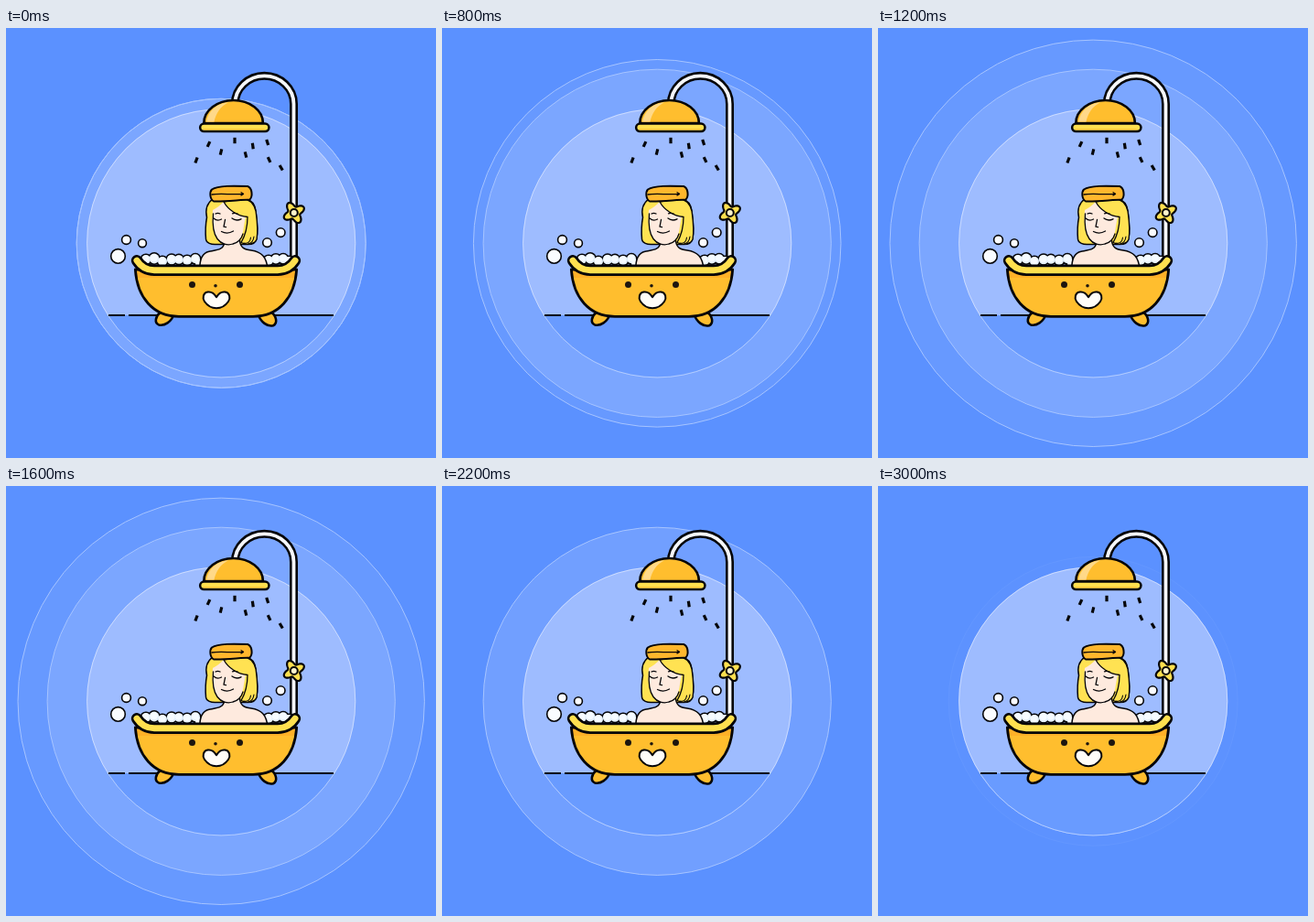
Animation of 470x470 px, one loop 3200 ms. Source, as an HTML page with a canvas:

```html
<!DOCTYPE html>
<html lang="en">
<head>
<meta charset="utf-8">
<title>Bath time</title>
<style>
html, body { margin: 0; width: 100%; height: 100%; overflow: hidden; background: #5b91ff; }
canvas { display: block; }
</style>
</head>
<body>
<canvas id="stage" width="470" height="470"></canvas>
<script>
const ctx = document.getElementById('stage').getContext('2d');
const CX = 235.2, CY = 235.3, DISC = 147, BASE = 147.3, GROW = 10.7;
const STEP = 200, STEPS = 16;
const INK = '#050508', GOLD = '#ffbe2e', YELLOW = '#ffe04f', HAIR = '#ffe252', SKIN = '#feeade';

function paint(path, fill, stroke, width) {
  if (fill) { ctx.fillStyle = fill; ctx.fill(path); }
  if (stroke) { ctx.strokeStyle = stroke; ctx.lineWidth = width; ctx.stroke(path); }
}

function shape(d, fill, stroke, width) {
  paint(new Path2D(d), fill, stroke, width);
}

function circle(x, y, r, fill, stroke, width) {
  const p = new Path2D();
  p.arc(x, y, r, 0, Math.PI * 2);
  paint(p, fill, stroke, width);
}

function tube(d, outer, inner, color) {
  shape(d, null, INK, outer);
  shape(d, null, color, inner);
}

function ring(r, fillAlpha, opacity) {
  ctx.globalAlpha = opacity;
  circle(CX, CY, r, `rgba(255,255,255,${fillAlpha})`, '#a6c4ff', 1);
  ctx.globalAlpha = 1;
}

// Both rings grow together; the middle one waits while the outer one goes on.
function rings(k) {
  const last = k === STEPS - 1;
  const level = last ? 1 : k < 8 ? k + 1 : 15 - k;
  const outer = k <= 8 ? 1 : Math.max(0, 1 - (k - 8) * 0.32);
  const middle = k <= 11 ? 1 : last ? 0.1 : 1 - (k - 11) * 0.22;
  ring(BASE + GROW * level, 0.07, outer);
  ring(BASE + GROW * Math.min(level, 4), 0.13, middle);
}

function disc() {
  circle(CX, CY, DISC, '#9ebcff');
  ctx.save();
  ctx.beginPath();
  ctx.rect(0, 314, 470, 156);
  ctx.clip();
  circle(CX, CY, DISC, '#699bff');
  ctx.restore();
  circle(CX, CY, DISC - 0.4, null, 'rgba(255,255,255,.48)', 1);
  shape('M112 314H130M134 314H358', null, INK, 2);
}

function shower() {
  ctx.lineCap = 'butt';
  tube('M250.3 84V83A32.1 30.7 0 0 1 314.5 83V256', 9, 3.8, '#f6f8fb');
  shape('M216.3 104A32.3 25 0 0 1 280.9 104Z', GOLD, INK, 2.6);
  shape('M219 102.5C221.5 90 231 82 243 81.2C234 86 229.5 93 227.5 102.5Z', '#ffd989');
  ctx.lineCap = 'round';
  tube('M216.4 108.8H283.2', 11, 6, YELLOW);
  shape('M216 110.6H282', null, '#ffc93a', 1.4);
}

function drops() {
  const list = [
    [221.5, 127, 25], [250, 123, 0], [285.7, 125, -18], [235, 135.5, 14], [269.8, 129, -8],
    [208, 144.5, 20], [262, 138.5, -14], [287.6, 144, -25], [300.7, 152.7, -30]
  ];
  ctx.fillStyle = INK;
  for (const [x, y, deg] of list) {
    ctx.save();
    ctx.translate(x, y);
    ctx.rotate(deg * Math.PI / 180);
    ctx.fillRect(-1.6, -3.2, 3.2, 6.4);
    ctx.restore();
  }
}

function valve() {
  const p = new Path2D();
  for (let a = 0; a < Math.PI * 2; a += 0.08) {
    const r = 9.5 + 2.8 * Math.cos(4 * (a + 0.52));
    p.lineTo(314.8 + r * Math.cos(a), 202 + r * Math.sin(a));
  }
  p.closePath();
  paint(p, YELLOW, INK, 2.2);
  circle(314.8, 202, 4, '#fff4cb', INK, 2.1);
}

function cloud(bumps) {
  for (const [x, y, r] of bumps) circle(x, y, r, null, INK, 3.2);
  for (const [x, y, r] of bumps) circle(x, y, r, '#e6f2fc');
  for (const [x, y, r] of bumps) circle(x - 0.4, y - 0.8, r * 0.75, '#f6fbff');
}

function foam() {
  cloud([[153, 253, 5], [162, 252, 5.4], [171, 255, 5], [181, 253, 5.2],
    [189, 253, 4.8], [198, 254, 5], [207, 252.3, 5], [211, 257, 4]]);
  cloud([[287, 254, 5], [295, 252.5, 5], [303, 252.3, 5], [309, 255, 5]]);
}

function bubbles() {
  for (const [x, y, r] of [[122.5, 249.4, 7.8], [131.5, 231.5, 4.9], [149, 235.2, 4.4],
    [285.5, 234.6, 4.8], [300.2, 223.6, 4.8]]) circle(x, y, r, '#fafcff', INK, 1.6);
}

function woman() {
  // hair
  shape('M226 187C219 192 218 200 219.5 207C218 215 218 225 218.5 231C219 235 224 237 230 236.5' +
    'L262 236.5C268 237 273 235 274 230C276 219 274 208 273 200C272 192 268 188 262 186Z',
    HAIR, INK, 1.5);
  // shoulders
  shape('M211.8 264C211.5 252 215 245.8 222 244.3C231 242.6 238 242.5 238.8 234L255.5 232' +
    'C256 240.5 261 242 268 243C279 244.6 285 250 286 264Z', SKIN, INK, 1.5);
  // face
  shape('M226 199C225 212 226 223 230 229C234 235.5 242 238 248 236C256 234 259 226 260 217' +
    'L262 206C253 205 243 198 238 190C234 194 230 197 226 199Z', SKIN);
  shape('M226.5 203C225.5 214 227 225 231 230.5C235 236 242 238 248 236C254 234.5 257.5 230 259 225',
    null, INK, 1.3);
  shape('M238 190C243 199 253 205.5 264 206.5C264 217 262 226 257 234.5C264 238 272 236 274 231' +
    'C276 219 274 208 273 200C271 191 266 187 258 186Z', HAIR, INK, 1.3);
  shape('M260 235C265 236 267 233 267.5 229M265 235.7C269 235 270.5 232 271 228', null, INK, 1.1);
  // features
  shape('M227 208Q231 211.5 235.5 209M247 208Q251.5 211.5 257 208.8M239.5 209.5L238 217.2L240.5 217.7' +
    'M235.5 222.5Q242 225.8 248.5 222M229 203Q231.5 201.8 234 203M247.5 202.8Q250.5 201.8 253.5 203.4',
    null, INK, 1.3);
  // towel
  shape('M225 176.5C232 172 249 172.5 264 173C269 174.5 270 184 266.5 187.5C254 188 238 190 227 189.5' +
    'C222.5 187 222.5 179 225 176.5Z', '#ffb72d', INK, 2);
  shape('M225 182C235 180.5 247 182.5 258 181.4M257 179.8L259.5 181.4L257 183', null, INK, 1.3);
}

function tub() {
  shape('M169 310.5C163 315.5 162 322.2 167 324.4C173 326.2 181 321 183 313.5Z', GOLD, INK, 2.6);
  shape('M290 310.5C296 315.5 297 323 292 325.2C286 327 278 321 276 313.5Z', GOLD, INK, 2.6);
  const body = new Path2D('M141.3 264C143.5 295 161 315.3 189 315.3H270C298 315.3 315.5 295 317.7 264Z');
  paint(body, GOLD);
  ctx.save();
  ctx.clip(body);
  shape('M140 262H320V273H140Z', '#ffb128');
  ctx.restore();
  paint(body, null, INK, 2.8);
  tube('M143 254.2C148 262 154 264.8 162 264.8H297C305 264.8 311 262 316 254.2', 12.4, 7, YELLOW);
  circle(203.5, 280.4, 3.5, '#1c150f');
  circle(255.5, 280.4, 3.5, '#1c150f');
  circle(229, 281.8, 1.8, '#1c150f');
  shape('M230 294.2C227.5 290 224 288 220.5 288.6C215.5 289.5 214.3 295 217 299C220 303.3 225 306.2 230 306.2' +
    'C235 306.2 240 303.3 243 299C245.7 295 244.5 289.5 239.5 288.6C236 288 232.5 290 230 294.2Z',
    '#fffdf8', INK, 2);
}

function draw(t) {
  ctx.lineCap = 'butt';
  ctx.lineJoin = 'round';
  ctx.fillStyle = '#5b91ff';
  ctx.fillRect(0, 0, 470, 470);
  rings(Math.floor(t / STEP) % STEPS);
  disc();
  shower();
  drops();
  foam();
  woman();
  bubbles();
  valve();
  tub();
}

const start = performance.now();
function tick() {
  draw(performance.now() - start);
  requestAnimationFrame(tick);
}
tick();
</script>
</body>
</html>
```
